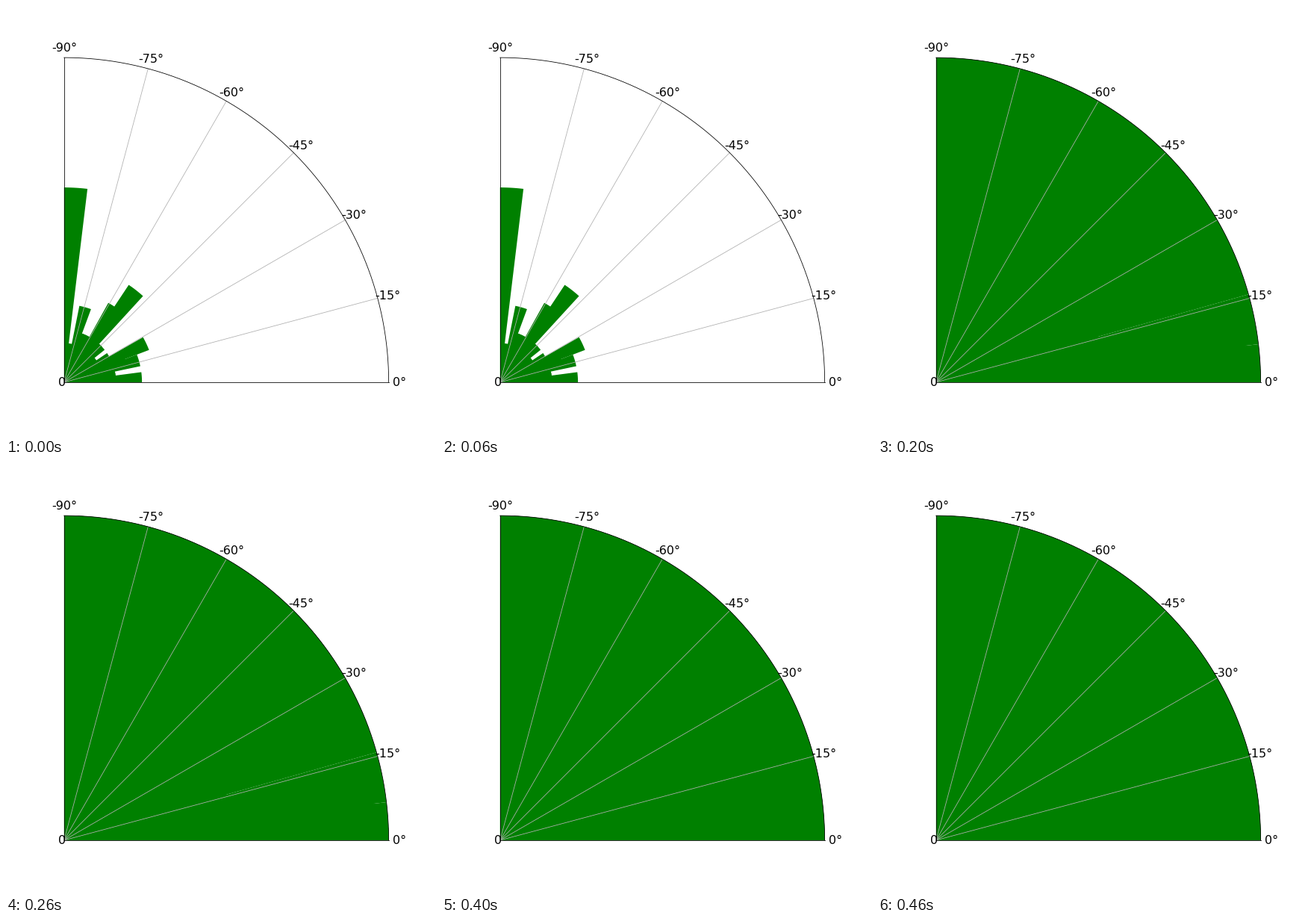
Recreate the animation shown at these times as a matplotlib script. Size 576 by 576 pixels, loop 500 ms.

```python
import numpy as np
import matplotlib.pyplot as plt
from matplotlib.animation import FuncAnimation
from matplotlib.patches import Polygon

SIZE = 576
CX, CY, R = 77.76, 72.0, 434.88   # corner and radius of the quarter disc
R_MAX = 25                        # count at the outer arc
FULL = 30                         # any count beyond the arc
BARS = 21

plt.rcParams["font.family"] = "DejaVu Sans"
fig = plt.figure(figsize=(SIZE / 72, SIZE / 72), dpi=72, facecolor="white")
ax = fig.add_axes([0, 0, 1, 1])
ax.set(xlim=(0, SIZE), ylim=(0, SIZE))
ax.axis("off")


def polar(deg, r):
    a = np.radians(deg)
    return CX + r * np.cos(a), CY + r * np.sin(a)


def filled(changes):
    """Counts that all pass the arc, except for the given bars."""
    counts = [FULL] * BARS
    for i, n in changes.items():
        counts[i] = n
    return counts


# Each histogram: centre of the first bar, bin step, counts.
# Bars are two steps wide, so neighbours overlap.
FIRST = [6, 4, 4, 6, 5, 7, 4, 3, 3, 4, 4, 9, 7, 4, 4, 4, 6, 3, 3, 15]
HISTS = [
    (3.0, 4.45, FIRST),
    (-2.25, 4.49, filled({0: 17, 1: 13, 2: 14, 3: 12, 4: 14,
                          5: 22, 6: 17, 9: 23})),
    (-2.25, 4.49, filled({2: 24, 4: 13})),
    (-2.25, 4.49, filled({4: 16})),
    (-2.25, 4.49, filled({})),
]


def sector(lo, hi, r):
    x, y = polar(np.linspace(lo, hi, 40), r)
    return np.vstack([(CX, CY), np.column_stack([x, y])])


def draw_frame():
    for deg in range(15, 90, 15):
        x, y = polar(deg, R)
        ax.plot([CX, x], [CY, y], color="#b0b0b0", lw=0.8, zorder=3)
    x, y = polar(np.linspace(0, 90, 200), R)
    ax.plot(x, y, color="black", lw=0.8, zorder=4)
    ax.plot([CX, CX], [CY, CY + R], color="black", lw=0.8, zorder=4)
    ax.plot([CX, CX + R], [CY, CY], color="black", lw=0.8, zorder=4)


def label(x, y, text):
    ax.text(x, y - 5.4, text, fontsize=16, ha="center", va="baseline",
            color="black", zorder=5)


draw_frame()
for deg in range(0, 91, 15):
    label(*polar(deg, R + 14), f"{-deg}°")
label(75.5, CY + 0.5, "0")

bars = [ax.add_patch(Polygon([(CX, CY)] * 3, facecolor="green", lw=0, zorder=2))
        for _ in range(BARS)]


def update(frame):
    start, step, counts = HISTS[frame]
    for i, bar in enumerate(bars):
        bar.set_visible(i < len(counts))
        if i < len(counts):
            mid = start + step * i
            lo, hi = max(mid - step, 0), min(mid + step, 90)
            bar.set_xy(sector(lo, hi, R * min(counts[i] / R_MAX, 1)))
    return bars


anim = FuncAnimation(fig, update, frames=len(HISTS), interval=100,
                     repeat=True, repeat_delay=0)
plt.show()
```
